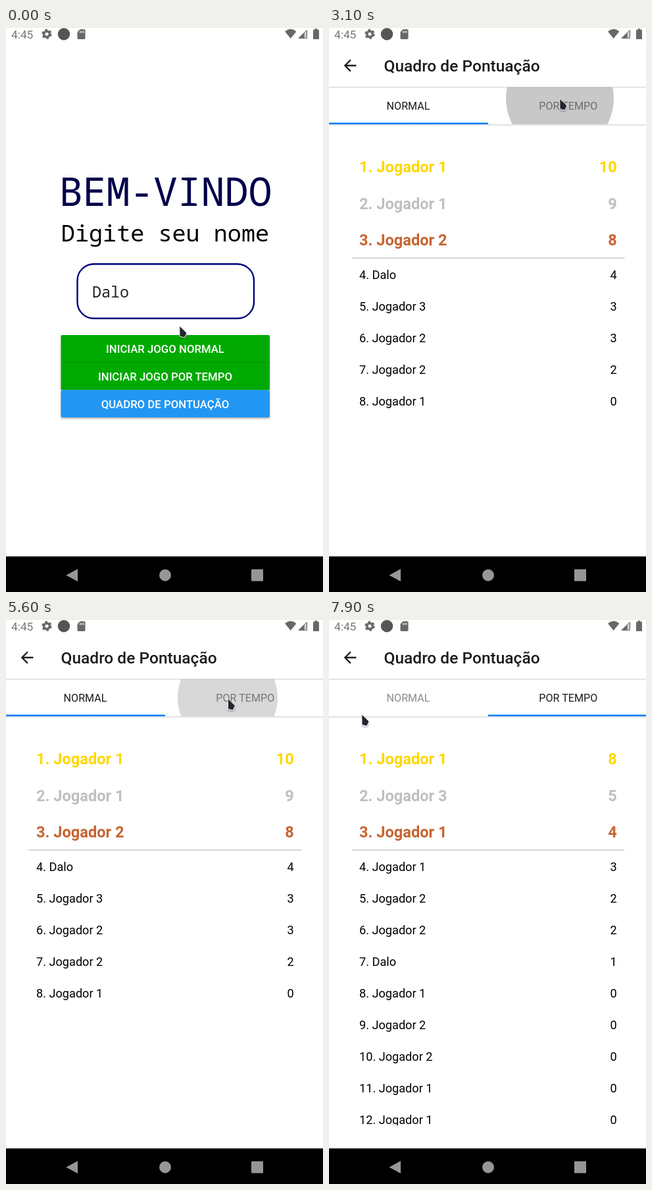
Recreate the animation shown at these times as an HTML page. Size 482 px wide and 856 px high, loop 8 s.

```html
<!DOCTYPE html>
<html lang="pt">
<head>
<meta charset="utf-8">
<title>Quadro de Pontuação</title>
<style>
  html, body { margin: 0; width: 100%; height: 100%; overflow: hidden; background: #fff; }
  svg { display: block; width: 482px; height: 856px; font-family: Roboto, sans-serif; }
  text { white-space: pre; }
  .mono { font-family: "Noto Sans Mono", monospace; }
  .button { font-size: 16.75px; font-weight: 500; fill: #fff; text-anchor: middle; }
  .tab { font-size: 16.1px; fill: #1c1c1e; text-anchor: middle; }
  .row { font-size: 18.15px; fill: #000; }
  .podium { font-size: 23.6px; font-weight: 700; }
  .score { text-anchor: end; }
</style>
</head>
<body>
<svg viewBox="0 0 482 856">
  <defs>
    <filter id="lift" x="-5%" y="-10%" width="110%" height="125%">
      <feDropShadow dx="0" dy="2" stdDeviation="1.6" flood-opacity=".3"/>
    </filter>
    <linearGradient id="shade" x2="0" y2="1">
      <stop stop-color="#000" stop-opacity=".15"/>
      <stop offset="1" stop-color="#000" stop-opacity="0"/>
    </linearGradient>
    <clipPath id="blueClip"><rect x="83.5" y="549.5" width="317.5" height="41.5" rx="2"/></clipPath>
    <clipPath id="tabClip"><rect y="90" width="482" height="56"/></clipPath>
    <clipPath id="listClip"><rect x="34.5" y="182" width="415" height="585"/></clipPath>
  </defs>

  <rect width="482" height="856" fill="#fff"/>

  <g id="home">
    <text class="mono" x="242.5" y="270" font-size="60" fill="#00004a" text-anchor="middle">BEM-VINDO</text>
    <text class="mono" x="242" y="324" font-size="35.15" text-anchor="middle">Digite seu nome</text>
    <rect x="108.5" y="358.2" width="268.5" height="82.6" rx="25" fill="none" stroke="#000080" stroke-width="2.4"/>
    <text class="mono" x="131" y="409" font-size="23.4" fill="#222">Dalo</text>
    <g filter="url(#lift)">
      <rect x="83.5" y="466" width="317.5" height="83.5" rx="2" fill="#0a0"/>
      <rect x="83.5" y="549.5" width="317.5" height="41.5" rx="2" fill="#2196f3"/>
    </g>
    <path d="M84 507.6H401" stroke="#000" stroke-opacity=".12"/>
    <g clip-path="url(#blueClip)"><circle id="press" cx="222" cy="573"/></g>
    <text class="button" x="242" y="493.3">INICIAR JOGO NORMAL</text>
    <text class="button" x="242" y="535">INICIAR JOGO POR TEMPO</text>
    <text class="button" x="242" y="577">QUADRO DE PONTUAÇÃO</text>
  </g>

  <g id="board">
    <rect y="20" width="482" height="782" fill="#fff"/>
    <g id="pages">
      <g id="normal"></g>
      <g transform="translate(482)">
        <g clip-path="url(#listClip)">
          <g id="timed"></g>
          <circle id="bottomGlow" cx="252" r="608" fill="#6200ee"/>
          <circle id="topGlow" cx="252" r="608" fill="#6200ee"/>
          <rect id="bar" x="444.3" width="4.9" height="571.5"/>
        </g>
      </g>
    </g>
    <rect y="89" width="482" height="3" fill="url(#shade)"/>
    <rect y="146" width="482" height="3.5" fill="url(#shade)"/>
    <path transform="translate(18 43) scale(1.17)" fill="#1c1c1e"
      d="M20 11H7.83l5.59-5.59L12 4l-8 8 8 8 1.41-1.41L7.83 13H20z"/>
    <text x="83.5" y="66" font-size="24.5" font-weight="500" fill="#1c1c1e">Quadro de Pontuação</text>
    <text id="tabNormal" class="tab" x="120.5" y="124.3">NORMAL</text>
    <text id="tabTimed" class="tab" x="363.8" y="124.3">POR TEMPO</text>
    <rect id="indicator" y="143.7" width="242" height="2.4" fill="#007aff"/>
    <g id="ripples" clip-path="url(#tabClip)"></g>
  </g>

  <g fill="#686868">
    <text x="8" y="16" font-size="17.3" fill="#757575">4:45</text>
    <circle cx="62" cy="9.3" r="4.3" fill="none" stroke="#686868" stroke-width="3.6"/>
    <circle cx="62" cy="9.3" r="6.5" fill="none" stroke="#686868" stroke-width="2.4" stroke-dasharray="3.6 3.2"/>
    <circle cx="88" cy="9.3" r="9.2" fill="#555"/>
    <path d="M112.5 2H119q1.5 0 1.5 1.5V15.5q0 1.5-1.5 1.5H110q-1.5 0-1.5-1.5V6Z"/>
    <path d="M112.7 4.5v3M115.2 4.5v3M117.7 4.5v3" stroke="#fff" stroke-width="1.2"/>
    <path d="M424 5.2Q432.7-2 441.5 5.2L432.7 16Z"/>
    <path d="M445 15.5H457.5V3Z" fill-opacity=".35" stroke="#686868"/>
    <path d="M444.5 16H453.5V7Z"/>
    <path d="M469.500 1h4v1.700h2.500V17h-9V2.700h2.500Z"/>
  </g>

  <rect y="802" width="482" height="54"/>
  <g fill="#969696">
    <path d="M91.5 830.5 109 821V840Z"/>
    <circle cx="242" cy="830.5" r="9"/>
    <rect x="373" y="821.5" width="18" height="18" rx="1"/>
  </g>

  <path id="cursor" d="M.8 0 12 11 8.5 18 1 16Z" fill="#24262e" stroke="#fff" stroke-width=".9" filter="url(#lift)"/>
</svg>

<script>
const LOOP = 8000, STEP = 100, WIDTH = 482;
const $ = id => document.getElementById(id);
const set = (el, attrs) => {
  for (const key in attrs) el.setAttribute(key, attrs[key]);
};

// Motion helpers
const ramp = (t, from, to) => Math.min(1, Math.max(0, (t - from) / (to - from)));
const mix = (a, b, part) => a + (b - a) * part;
const settle = x => 1 - (1 - x * x) ** 5;
const pulse = (t, from, peak) => ramp(t, from, peak) - ramp(t, peak + 100, peak + 400);
const scaled = s => `translate(241 401) scale(${s}) translate(-241 -401)`;

// Score lists
const players = { 1: "Jogador 1", 2: "Jogador 2", 3: "Jogador 3", D: "Dalo" };
const medals = ["#ffd700", "#c0c0c0", "#c86432"];

function fillList(id, ...entries) {
  const rows = entries.map((entry, i) => {
    const [who, score] = entry.split(":");
    const y = i < 3 ? 219 + i * 55.6 : 381 + (i - 3) * 47.95;
    const look = i < 3 ? `class="podium" fill="${medals[i]}"` : 'class="row"';
    return `<g ${look}><text x="46" y="${y}">${i + 1}. ${players[who]}</text>` +
      `<text class="score" x="437.8" y="${y}">${score}</text></g>`;
  });
  $(id).innerHTML = rows.join("") +
    '<path d="M34.5 349.2H449.5" stroke="#c8c8c8" stroke-width="1.5"/>';
}
fillList("normal", "1:10", "1:9", "2:8", "D:4", "3:3", "2:3", "2:2", "1:0");
fillList("timed", "1:8", "3:5", "1:4", "1:3", "2:2", "2:2", "D:1", "1:0", "2:0", "2:0", "1:0", "1:0");

// Pointer journeys
const home = { x: 263, y: 452 };
const moves = [
  { from: 200, to: 700, x: 222, y: 573 },
  { from: 1800, to: 2100, x: 214, y: 318 },
  { from: 2200, to: 2400, x: 275, y: 156 },
  { from: 2600, to: 2700, x: 350, y: 107 },
  { from: 3400, to: 3800, x: 157.5, y: 141 },
  { from: 4600, to: 4800, x: 200, y: 163 },
  { from: 4800, to: 5100, x: 355, y: 96 },
  { from: 5200, to: 5400, x: 336.5, y: 119 },
  { from: 5800, to: 6100, x: 258, y: 430 },
  { from: 6400, to: 6800, x: 252.5, y: 289 },
  { from: 7100, to: 7500, x: 245, y: 400 },
  { from: 7800, to: 7900, x: 49, y: 143 }
];

// Tab presses: a ripple grows to its tab's centre while the pager slides
const taps = [
  { at: 3100, x: 351, y: 107, page: 1, reach: 82, shade: .216 },
  { at: 4100, x: 121, y: 118, page: 0, reach: 124, shade: .19 },
  { at: 5600, x: 337, y: 118, page: 1, reach: 76, shade: .153 }
];
for (const tap of taps) {
  tap.circle = document.createElementNS("http://www.w3.org/2000/svg", "circle");
  $("ripples").append(tap.circle);
}

function drawCursor(t) {
  let { x, y } = home;
  for (const move of moves) {
    const part = ramp(t, move.from, move.to);
    x = mix(x, move.x, part);
    y = mix(y, move.y, part);
  }
  set($("cursor"), { transform: `translate(${x} ${y})` });
}

function drawOpening(t) {
  const open = ramp(t, 1200, 1500);
  set($("home"), { transform: scaled(1 + .11 * open) });
  set($("board"), { transform: scaled(.95 + .05 * open), opacity: ramp(t, 1300, 1430) });
  set($("press"), { r: 330 * ramp(t, 900, 1200), opacity: .12 * (1 - ramp(t, 1150, 1400)) });
}

function drawTabs(t) {
  let page = 0;
  for (const tap of taps) {
    const age = t - tap.at;
    const grow = ramp(age, 0, 200);
    page = mix(page, tap.page, settle(ramp(age, 0, 300)));
    set(tap.circle, {
      cx: mix(tap.x, 121 + 240.5 * tap.page, grow),
      cy: mix(tap.y, 118, grow),
      r: mix(tap.reach, 124, grow),
      opacity: age < 0 ? 0 : tap.shade * (1 - ramp(age, 0, 300))
    });
  }
  set($("pages"), { transform: `translate(${-WIDTH * page})` });
  set($("indicator"), { x: 242 * page });
  set($("tabNormal"), { opacity: 1 - page / 2 });
  set($("tabTimed"), { opacity: .5 + page / 2 });
}

function drawScroll(t) {
  const scroll = 5.5 * (ramp(t, 6400, 6600) - ramp(t, 7100, 7300));
  const low = pulse(t, 6500, 6800), high = pulse(t, 7200, 7500);
  set($("timed"), { transform: `translate(0 ${-scroll})` });
  set($("bar"), { y: 182 + scroll, opacity: .3 * (ramp(t, 6400, 6500) - ramp(t, 7600, 7900)) });
  set($("bottomGlow"), { cy: 1371 - 40 * low, opacity: .16 * low });
  set($("topGlow"), { cy: 40 * high - 422, opacity: .16 * high });
}

const start = performance.now();
function tick() {
  const elapsed = (performance.now() - start) % LOOP;
  const t = Math.floor(elapsed / STEP) * STEP;
  drawCursor(t);
  drawOpening(t);
  drawTabs(t);
  drawScroll(t);
  requestAnimationFrame(tick);
}
tick();
</script>
</body>
</html>
```
